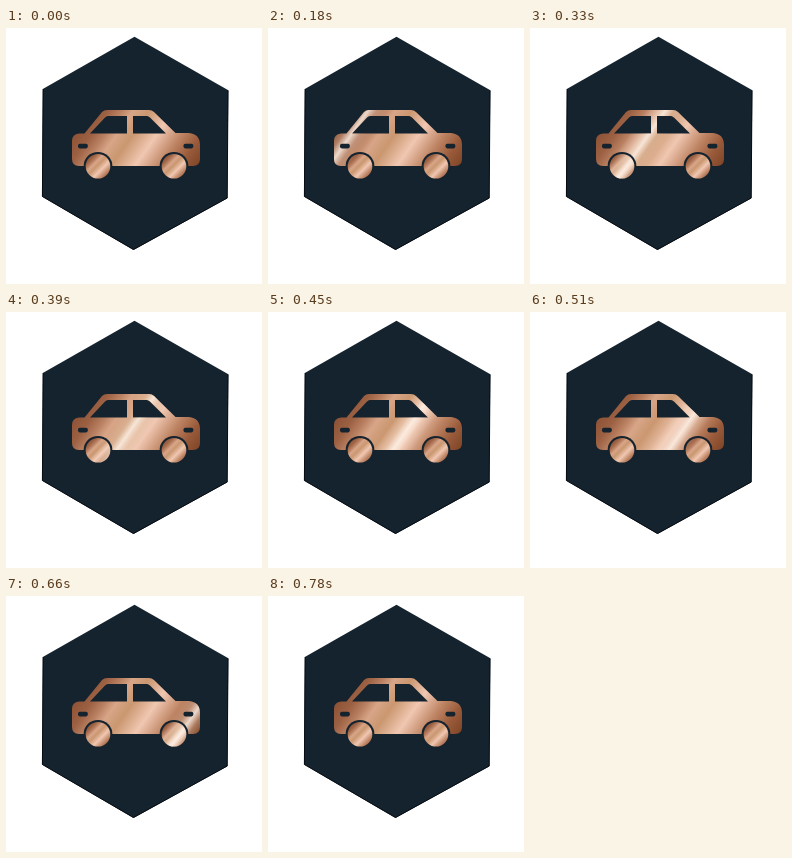
An HTML page for the animation above (2.7 s loop, 256 by 256 pixels).

```html
<!DOCTYPE html>
<html lang="en">
<head>
<meta charset="utf-8">
<title>Car badge</title>
<style>
  html, body { margin: 0; width: 100%; height: 100%; overflow: hidden; background: #fff; }
  svg { display: block; width: 100vw; height: 100vh; }
</style>
</head>
<body>
<svg viewBox="0 0 256 256">
  <defs>
    <linearGradient id="copper" gradientUnits="userSpaceOnUse" x1="94" y1="65.8" x2="194.6" y2="136.2">
      <stop offset="0" stop-color="#8c5034"/>
      <stop offset=".13" stop-color="#9c6043"/>
      <stop offset=".22" stop-color="#b87f60"/>
      <stop offset=".3" stop-color="#d8a588"/>
      <stop offset=".41" stop-color="#ca9770"/>
      <stop offset=".57" stop-color="#f0c7b1"/>
      <stop offset=".74" stop-color="#bd8362"/>
      <stop offset=".87" stop-color="#985a3a"/>
      <stop offset="1" stop-color="#7f4526"/>
    </linearGradient>
    <linearGradient id="rim" href="#copper" gradientUnits="objectBoundingBox" x1=".08" y1=".08" x2="1.05" y2="1.05"/>
    <linearGradient id="shine" gradientUnits="userSpaceOnUse" x1="-13.4" y1="-9.4" x2="13.4" y2="9.4">
      <stop offset="0" stop-color="#fff0e2" stop-opacity="0"/>
      <stop offset=".28" stop-color="#fff0e2" stop-opacity=".25"/>
      <stop offset=".5" stop-color="#fff5ec" stop-opacity=".82"/>
      <stop offset=".72" stop-color="#fff0e2" stop-opacity=".25"/>
      <stop offset="1" stop-color="#fff0e2" stop-opacity="0"/>
    </linearGradient>
    <path id="body" fill-rule="evenodd" d="M101 82H143Q146 82 148 84L169.500 105H183Q194 106 194 117V131Q194 138 187 138H73Q66 138 66 131V113Q66 106 73 105.500H78.500L96 84Q98 82 101 82Z
      M102 88Q100 88 99 89.500L84 105.500H121V88Z M127 88V105.500H160L144 89.500Q142.500 88 141 88Z"/>
    <g id="wheels">
      <circle cx="92" cy="138.3" r="12.3"/>
      <circle cx="168" cy="138.3" r="12.3"/>
    </g>
  </defs>

  <path fill="#15232e" d="M128.500 8.800L222.300 62.300L221.400 170.200L127.500 222L36 168.500L36.800 61Z"/>
  <path fill="none" stroke="#070d12" d="M222 62.500L221.200 170L127.500 221.500L36.400 168.500L37.200 61"/>

  <use href="#body" fill="url(#copper)"/>
  <use class="shine" href="#body" fill="url(#shine)"/>
  <g fill="#15232e">
    <circle cx="92" cy="138.3" r="14.4"/>
    <circle cx="168" cy="138.3" r="14.4"/>
    <rect x="72" y="115.800" width="9.800" height="4.600" rx="1.800"/>
    <rect x="177.500" y="115.800" width="9.800" height="4.600" rx="1.800"/>
  </g>
  <use href="#wheels" fill="none"/>
  <g fill="url(#rim)">
    <circle cx="92" cy="138.3" r="12.3"/>
    <circle cx="168" cy="138.3" r="12.3"/>
  </g>
  <use class="shine" href="#wheels" fill="url(#shine)"/>
</svg>
<script>
  const LOOP = 2700, STEP = 30, START = 120, END = 780;
  const band = document.getElementById('shine');
  const layers = document.querySelectorAll('.shine');
  const origin = performance.now();

  // The slanted band follows the line x + 0.7y = offset.
  function draw(now) {
    const time = Math.max(0, now - origin) % LOOP;
    const t = Math.floor(time / STEP) * STEP;
    const offset = 144 + 0.235 * (t - START);
    const visible = t >= START && t < END;
    band.setAttribute('gradientTransform', `translate(${offset} 0)`);
    layers.forEach(layer => layer.setAttribute('visibility', visible ? 'visible' : 'hidden'));
    requestAnimationFrame(draw);
  }
  draw(origin);
</script>
</body>
</html>
```
